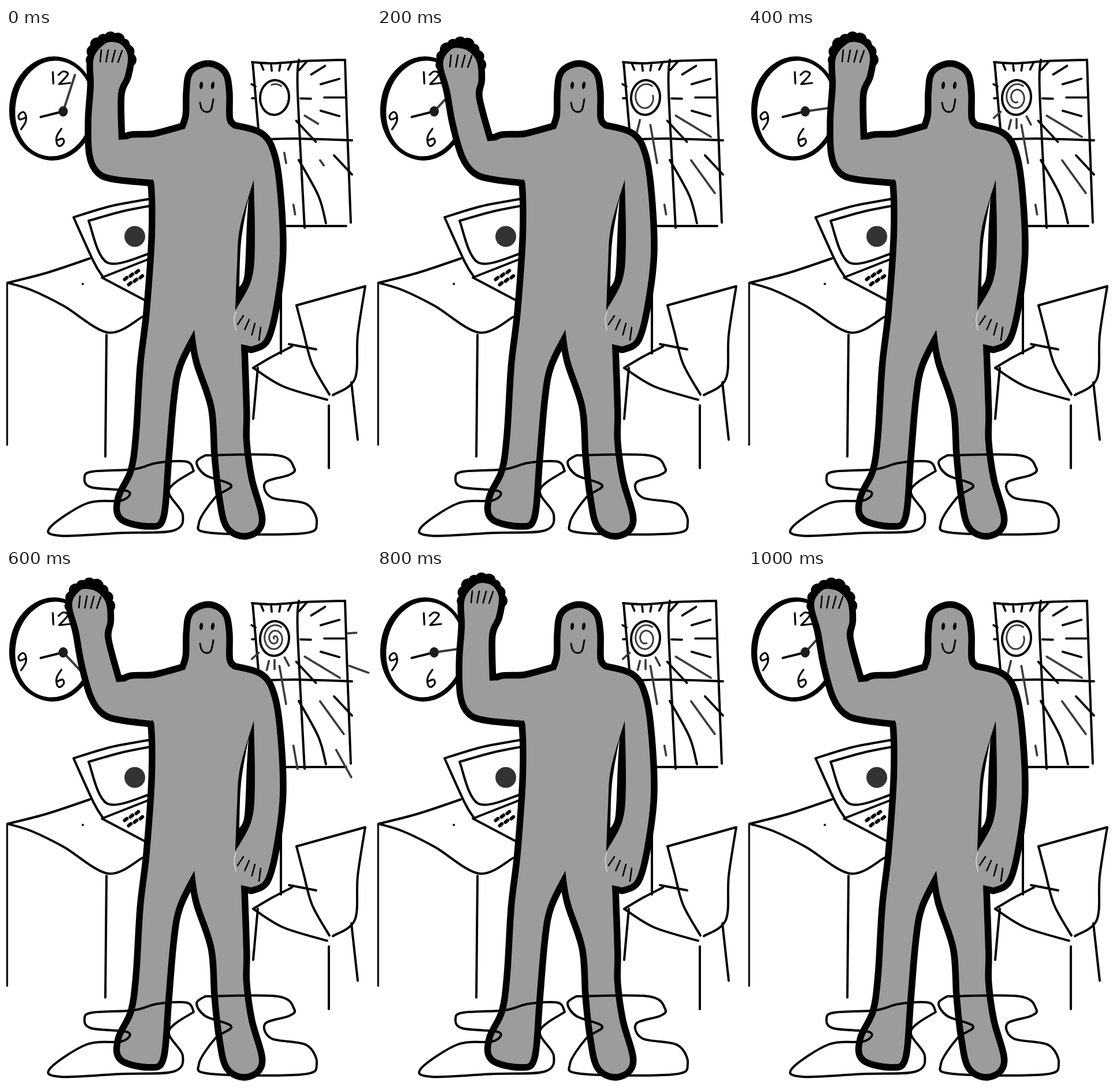
These frames come from a looping animation (632x886 px, 1.2 s). An HTML page with a canvas:

```html
<!DOCTYPE html>
<html lang="en">
<head>
<meta charset="utf-8">
<title>Waving figure</title>
<style>
html, body { margin: 0; width: 100%; height: 100%; overflow: hidden; background: #fff; }
canvas { display: block; width: 632px; height: 886px; }
</style>
</head>
<body>
<canvas id="stage" width="632" height="886"></canvas>
<script>
const ctx = document.getElementById('stage').getContext('2d');
const INK = '#000', SKIN = '#9c9c9c', DARK = '#3c3c3c';
const STEP = 200, PEAK = 3;
const HALO = 23;
const TURN = Math.PI * 2;
const SUN = { x: 465, y: 120, rx: 25, ry: 30 };
const CLOCK = { x: 80, y: 139, rx: 72, ry: 87 };

const lerp = (a, b, t) => a + (b - a) * t;
const rad = deg => deg * Math.PI / 180;

// Smooth curve through "x,y x,y ..."; "|" makes a sharp corner.
function trace(spec, warp = p => p) {
  const path = new Path2D();
  let last;
  for (const part of spec.split('|')) {
    const pts = part.trim().split(/\s+/).map(p => warp(p.split(',').map(Number)));
    if (last) pts.unshift(last); else path.moveTo(...pts[0]);
    for (let i = 0; i < pts.length - 1; i++) {
      const b = pts[i], c = pts[i + 1], a = pts[i - 1] || b, d = pts[i + 2] || c;
      path.bezierCurveTo(
        b[0] + (c[0] - a[0]) / 6, b[1] + (c[1] - a[1]) / 6,
        c[0] - (d[0] - b[0]) / 6, c[1] - (d[1] - b[1]) / 6, ...c);
    }
    last = pts[pts.length - 1];
  }
  return path;
}

function stroke(path, width = 4, color = INK) {
  ctx.lineWidth = width;
  ctx.strokeStyle = color;
  ctx.stroke(path);
}
function fill(path, color = INK) {
  ctx.fillStyle = color;
  ctx.fill(path);
}
const draw = (...specs) => specs.forEach(s => stroke(trace(s)));

function oval(x, y, rx, ry = rx, tilt = 0) {
  const path = new Path2D();
  path.ellipse(x, y, rx, ry, tilt, 0, TURN);
  return path;
}

// Segment on a line through (x, y), given in polar form.
function spoke(x, y, deg, from, to, width, color) {
  const c = Math.cos(rad(deg)), s = Math.sin(rad(deg));
  const path = new Path2D();
  path.moveTo(x + c * from, y + s * from);
  path.lineTo(x + c * to, y + s * to);
  stroke(path, width, color);
}
const ray = (deg, from, to, color = DARK) => spoke(SUN.x, SUN.y, deg, from, to, 3.7, color);

// Four finger lines, blended from the first to the last one.
function fingers(first, last) {
  for (let i = 0; i < 4; i++) {
    const [x, y, u, v] = first.map((n, k) => lerp(n, last[k], i / 3));
    stroke(trace(`${x},${y} ${u},${v}`), 2.6);
  }
}

// A 6 by itself; turned half round it is a 9.
function sixOrNine(x, y, turn) {
  ctx.save();
  ctx.translate(x, y);
  ctx.rotate(turn);
  stroke(trace('2,-16 -6,-3 -6,9 -1,14 6,8 4,1 -5,4'), 3.2);
  ctx.restore();
}

function drawClock(level) {
  const { x, y, rx, ry } = CLOCK;
  for (let i = 0; i < 3; i++) stroke(oval(x + i * 2, y + i - 1, rx - i, ry - (i % 2) * 2, 0.12), 4.5);
  stroke(trace('81,76 82,96'), 3.2);
  stroke(trace('91,81 99,75 107,80 92,97|111,95'), 3.2);
  sixOrNine(94, 190, 0);
  sixOrNine(28, 159, Math.PI);
  spoke(99, 144, 166, 0, 40);
  spoke(99, 144, -72 + 17 * level + 7.5 * level * level, 0, 66, 4, DARK);
  fill(oval(99, 144, 8, 9), '#1c1c1c');
}

function drawSun(level) {
  stroke(oval(SUN.x, SUN.y, SUN.rx, SUN.ry, 0.1));
  const turns = 0.15 + 0.75 * level, path = new Path2D();
  for (let t = 0; t <= turns; t += 0.02) {
    const a = rad(-55) - t * TURN, size = 0.8 - 0.32 * t;
    path.lineTo(SUN.x + Math.cos(a) * SUN.rx * size, SUN.y + Math.sin(a) * SUN.ry * size);
  }
  stroke(path, 3, DARK);
}

function drawRays(level) {
  for (let deg = -112; deg <= 16; deg += 16) {
    const side = Math.cos(rad(deg)) ** 2;
    ray(deg, 46 + 40 * side, 55 + 67 * side, INK);
  }
  ray(2, 45, 63, INK);
  ray(47, 55, 105, INK);
  ray(-150, 38, 46, INK);
  ray(178, 33, 39, INK);

  const grown = level > 0, most = level === PEAK;
  ray(31, 61, grown ? 132 : 88);
  ray(54, 134, grown ? 204 : 145);
  ray(80, grown ? 48 : 97, 115);
  ray(80, 188, most ? 229 : 205);
  if (grown) ray(104, 40, level > 1 ? 56 : 67);
  if (level > 1) for (const deg of [62, 90, 138]) ray(deg, 37, 53);
  if (most) {
    ray(-4, 127, 142);
    ray(20, 138, 173);
    ray(61, 220, 274);
  }
}

function drawWindow(level) {
  draw('426,59 465,61 520,57 587,55', '427,59 437,174', '507,55 505,110 517,345',
    '587,55 590,150 597,336', '440,193 500,191 599,194', '465,342 589,342',
    '507,228 541,290 554,337', '568,220 599,253');
  drawSun(level);
  drawRays(level);
}

function drawDesk() {
  draw('3,440 70,423 145,398', '3,440 45,453 100,480 177,526 236,499', '174,530 172,740');
  stroke(trace('2,440 2,720'), 3);
  fill(oval(133, 442, 2));
  draw('250,295 180,308 117,327|152,404 168,430', '250,307 200,317 143,333|175,405 250,389',
    '250,398 166,431|240,470');
  fill(oval(223, 360, 18), '#333');
  for (let i = 0; i < 6; i++) {
    const col = i % 3, row = i > 2;
    spoke(207 + 10 * col + 7 * row, 433 - 6 * col + 9 * row, -40, -2, 3, 6);
  }
}

function drawChair() {
  draw('503,479 622,446|609,530 604,606 566,634', '503,479 515,525 530,580 560,633',
    '428,587 460,568 495,550', '490,546 537,555', '428,587 480,619 556,642',
    '559,652 559,760', '598,612 609,711', '476,440 476,562', '436,587 428,675');
}

const BODY = '250,262|207,197 258,188 310,174|317,150 318,110 324,79 350,67 374,79 381,110 382,158 393,173'
  + '|440,187 460,222 470,290 474,390 463,480 448,536 425,550|407,546'
  + '|411,660 411,715 420,780 438,850 416,872 387,859 375,810 367,740 361,655 335,575 326,521'
  + '|296,582 285,640 276,745 268,840 250,855 203,844 200,812 222,765 231,700 238,585 249,490 258,360 257,272 250,262';
const ARM = '252,262|190,256 163,246 150,218 148,160 152,100 152,52 172,27 190,25 203,32 211,50 206,82 194,115 195,193|250,190';

function drawFigure(wave) {
  // The forearm leans from the elbow; the shoulder side stays put.
  const lean = ([x, y]) => {
    const lift = x < 212 ? 250 - y : 0;
    return lift ? [x + wave * (10 - 0.24 * lift), y + wave * lift * 0.045] : [x, y];
  };
  const body = trace(BODY), arm = trace(ARM, lean);
  const [hx, hy] = lean([181, 55]);
  stroke(body, HALO);
  stroke(arm, HALO);
  for (let i = 0; i <= 8; i++) {
    const a = Math.PI * (1 + i / 8);
    fill(oval(hx + 33 * Math.cos(a), hy + 38 * Math.sin(a), 10 + (i % 3)));
  }
  fill(body, SKIN);
  fill(arm, SKIN);

  fill(trace('429,262|405,345 400,410 397,488|425,435 431,370 429,262'));
  fill(trace('420,292 407,370 404,448|413,425 417,340 420,292'), '#fff');
  stroke(trace('398,490 395,504 398,522'), 1.5, '#ddd');

  fingers([hx - 16, hy - 17, hx - 18, hy + 3], [hx + 20, hy - 16, hx + 13, hy + 4]);
  fingers([411, 497, 401, 512], [441, 517, 438, 539]);

  fill(oval(338, 99, 3, 6.5, 0.1));
  fill(oval(358, 99, 3, 6.5, 0.15));
  stroke(trace('336,129 339,140 347,145 355,141 359,123'), 3);
}

function drawPuddles() {
  draw('325,765 313,749 262,751 222,762 150,766 136,776 147,793 211,800 200,816 140,821 76,863 95,877 200,872 290,868 306,840 282,798 325,765',
    '345,738 470,738 499,760 490,772 449,785 460,811 520,822 538,855 512,873 355,872 334,855 362,811 390,790 345,772 330,750 345,738');
}

function paint(time) {
  const step = Math.floor(time / STEP);
  const level = PEAK - Math.abs(step % (2 * PEAK) - PEAK);
  ctx.fillStyle = '#fff';
  ctx.fillRect(0, 0, 632, 886);
  ctx.lineCap = ctx.lineJoin = 'round';
  drawClock(level);
  drawWindow(level);
  drawDesk();
  drawChair();
  drawFigure(step % 2);
  drawPuddles();
}

const start = performance.now();
function tick() {
  paint(performance.now() - start);
  requestAnimationFrame(tick);
}
tick();
</script>
</body>
</html>
```
